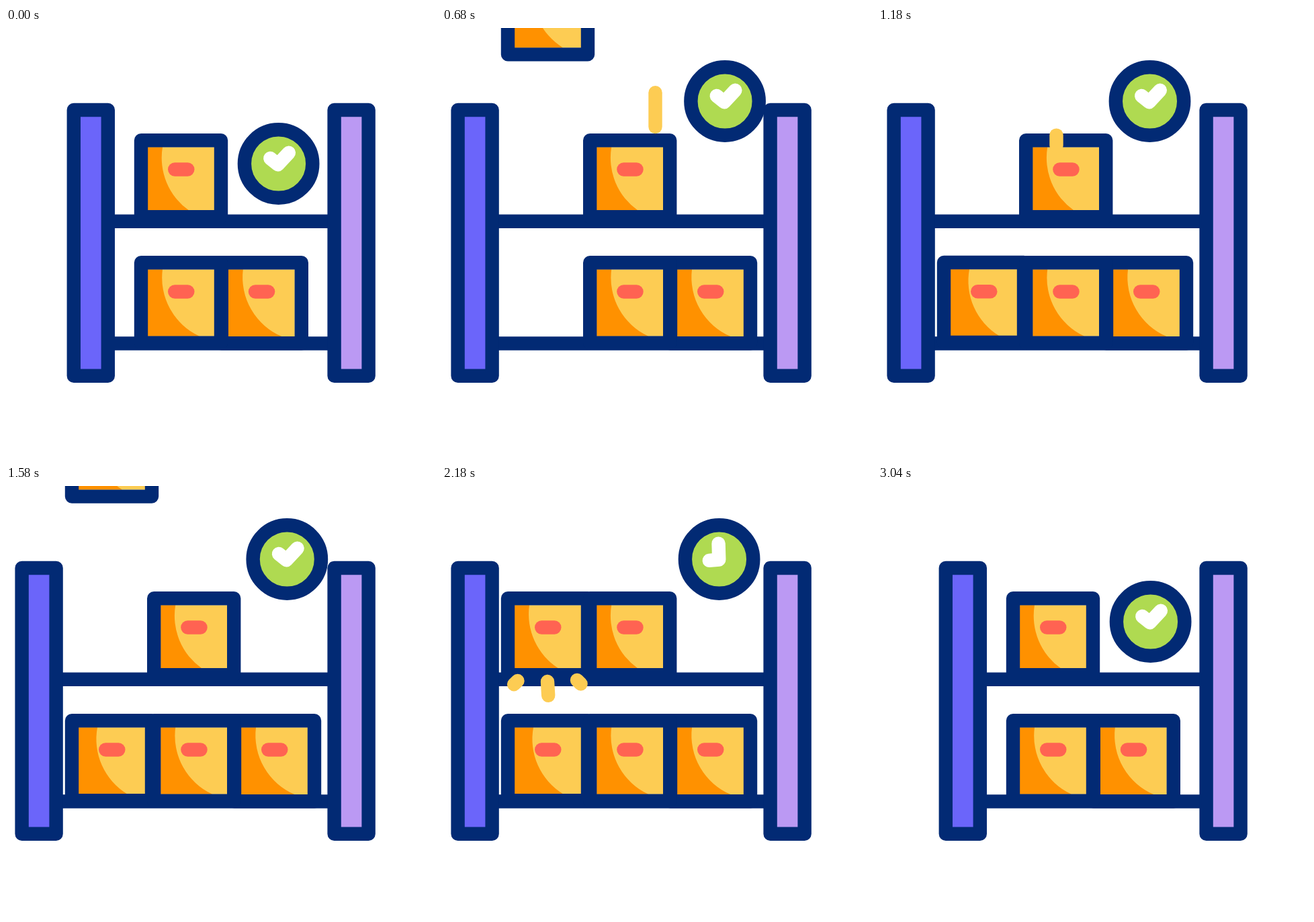
Write an HTML page that moves like this. It is 640 px wide and 640 px high and loops after 3.44 s.

```html
<!DOCTYPE html>
<html lang="en">
<head>
<meta charset="utf-8">
<title>Shelf</title>
<style>
  html, body { margin: 0; width: 100%; height: 100%; overflow: hidden; background: #fff; }
  svg { display: block; width: 100vw; height: 100vh; }
  .edge { fill: none; stroke: #022a74; stroke-width: 20.4; stroke-linejoin: round; }
  .line { fill: none; stroke: #fdcc53; stroke-width: 20.4; stroke-linecap: round; }
</style>
</head>
<body>
<svg id="stage" viewBox="0 0 640 640"></svg>
<script>
const LOOP = 3440;
const stage = document.getElementById('stage');

function add(parent, tag, attrs = {}) {
  const el = document.createElementNS('http://www.w3.org/2000/svg', tag);
  for (const key in attrs) el.setAttribute(key, attrs[key]);
  parent.appendChild(el);
  return el;
}

const group = () => add(stage, 'g');
const move = (el, x, y) => el.setAttribute('transform', `translate(${x} ${y})`);

// Origin: top left of the coloured inside. The shade runs from `top` to `foot`.
function box(parent, x, y, h, top, foot) {
  const g = add(parent, 'g', { transform: `translate(${x} ${y})` });
  add(g, 'rect', { width: 99, height: h, fill: '#fdcc53' });
  add(g, 'path', { d: `M0 0H${top}A96 96 0 0 0 ${foot} ${h}H0Z`, fill: '#ff9100' });
  add(g, 'rect', { x: 30, y: 23, width: 39.5, height: 20.5, rx: 10.2, fill: '#ff6352' });
  add(g, 'rect', { x: -10, y: -10, width: 119, height: h + 20, class: 'edge' });
  return g;
}

function post(parent, x, fill) {
  add(parent, 'rect', { x, y: 122, width: 51, height: 395.7, class: 'edge', style: `fill:${fill}` });
}

const shelves = [287.8, 469.5].map(y => add(stage, 'path', { class: 'edge', 'data-y': y }));
const lowBox = box(stage, 0, 0, 99, 28, 72);
const highBox = box(stage, 0, 0, 94, 22, 65);

const stock = group();
box(stock, 211, 177.3, 94, 22, 61);
box(stock, 330.8, 359.3, 100, 22, 80);
box(stock, 211, 359.3, 99.5, 22, 77);

const leftPost = group();
post(leftPost, 100.8, '#6b65fa');
post(stage, 488.6, '#bb99f3');

const badge = group();
add(badge, 'circle', { r: 50.7, class: 'edge', style: 'fill:#afda51' });
const tick = add(badge, 'path', {
  d: 'M-12.3 -8L-1 1.2L15.3 -16.3', fill: 'none', stroke: '#fff',
  'stroke-width': 20.4, 'stroke-linecap': 'round', 'stroke-linejoin': 'round'
});

// Each streak: two ends, start time, growing time, and when the tail follows.
const streaks = [];
function streak(x1, y1, x2, y2, start, span, wait) {
  streaks.push({ x1, y1, x2, y2, start, span, wait, el: add(stage, 'path', { class: 'line' }) });
}
streak(317.5, 83, 317.5, 147, 320, 310, 270);
streak(265.5, 111, 265.5, 175, 700, 310, 270);

function splash(y, start) {
  streak(157, y, 158.5, y + 26, start, 120, 110);
  streak(112.5, y - 1, 96, y + 15, start + 40, 120, 100);
  streak(201, y - 2, 218, y + 15, start + 40, 120, 100);
}
splash(473, 1190);
splash(291, 2095);

const clamp = v => Math.min(1, Math.max(0, v));
function ease(t, from, to) {
  const s = clamp((t - from) / (to - from));
  return s * s * (3 - 2 * s);
}

// Eased value of a [time, value] table.
function track(t, keys) {
  let value = keys[0][1];
  for (let i = 1; i < keys.length; i++) {
    value += (keys[i][1] - keys[i - 1][1]) * ease(t, keys[i - 1][0], keys[i][0]);
  }
  return value;
}

const OPEN = [[200, 0], [520, 1], [2600, 1], [2940, 0]];
const BADGE_X = [[200, 405.6], [600, 422.5], [1080, 403.5], [1800, 422.5], [2540, 403.5], [3030, 405.6]];
const BADGE_Y = [[200, 202], [600, 109], [2540, 109], [3030, 202]];
const TURN = [[200, 0], [590, -360], [1800, -360], [2200, -405], [2540, -405], [3030, -720]];
const LOW_Y = [[525, -139], [1190, 359.3]];
const HIGH_Y = [[1405, -139], [2100, 177.3]];
const ADDED_X = [[2600, 108], [3035, 211]];

function draw(t) {
  const open = track(t, OPEN);
  move(leftPost, -77.2 * open, 0);
  move(stock, 19.2 * open, 0);
  for (const s of shelves) {
    s.setAttribute('d', `M${130 - 77.2 * open} ${s.dataset.y}H500`);
  }

  const x = track(t, ADDED_X);
  move(lowBox, x, track(t, LOW_Y));
  move(highBox, x, track(t, HIGH_Y));
  const shown = t > 525 && t < 3035 ? 'visible' : 'hidden';
  lowBox.setAttribute('visibility', shown);
  highBox.setAttribute('visibility', shown);

  move(badge, track(t, BADGE_X), track(t, BADGE_Y));
  tick.setAttribute('transform', `rotate(${track(t, TURN)} -1.5 0)`);

  for (const s of streaks) {
    const head = ease(t, s.start, s.start + s.span);
    const tail = ease(t, s.start + s.wait, s.start + s.wait + s.span);
    const at = p => `${s.x1 + (s.x2 - s.x1) * p} ${s.y1 + (s.y2 - s.y1) * p}`;
    s.el.setAttribute('visibility', head > 0 && tail < 1 ? 'visible' : 'hidden');
    s.el.setAttribute('d', `M${at(tail)}L${at(Math.max(head, tail + 0.001))}`);
  }
}

const begin = performance.now();
function tickFrame() {
  draw((performance.now() - begin) % LOOP);
  requestAnimationFrame(tickFrame);
}
draw(0);
requestAnimationFrame(tickFrame);
</script>
</body>
</html>
```
